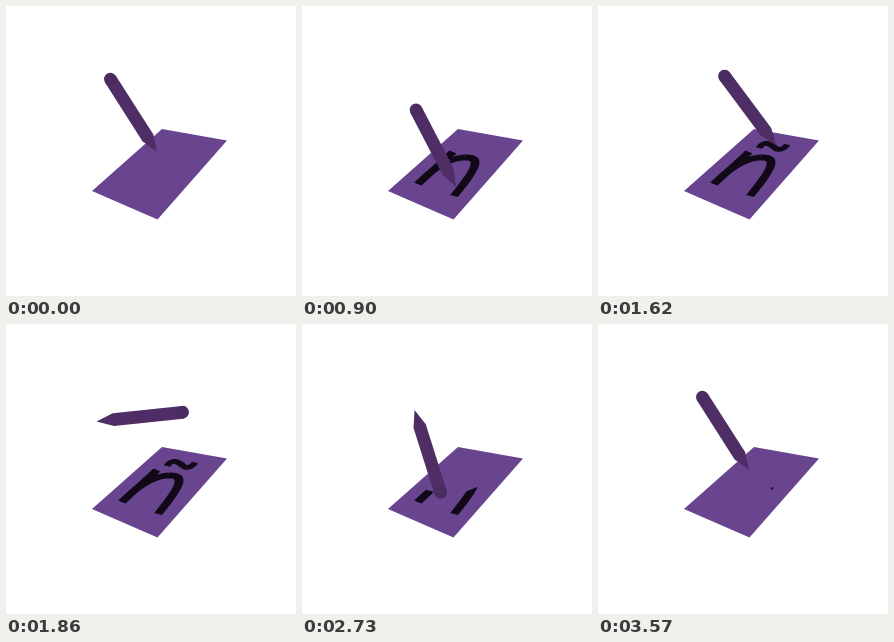
An HTML page with a canvas for the animation above (3600 ms loop, 290 by 290 pixels).

```html
<!DOCTYPE html>
<html lang="en">
<head>
<meta charset="utf-8">
<title>Pencil and eraser</title>
<style>
  html, body { margin: 0; width: 100%; height: 100%; overflow: hidden; background: #fff; }
  canvas { display: block; width: 290px; height: 290px; }
</style>
</head>
<body>
<canvas id="stage" width="290" height="290"></canvas>
<script>
const ctx = document.getElementById('stage').getContext('2d');
const LOOP = 3600, STEP = 30;
const LENGTH = 86.5, RADIUS = 6.4, SHOULDER = 17;
const CARD = '#69458f', INK = '#110917', BODY = '#4e2e65', CAP = '#4b2c60';
const WRITE_END = 1540, ERASE_START = 2025, ERASE_END = 3165, REST = 3570;

// Tip movement: start, end, ink width (0 = lifted), Bezier points
const writing = [
  [120, 330, 7.5, [151, 146], [140, 156], [128, 167], [116, 178]],
  [330, 580, 7.5, [116, 178], [130, 163], [148, 152], [162, 151.5]],
  [580, 820, 7.5, [162, 151.5], [181, 150.5], [174, 163], [152, 190]],
  [820, 1230, 0, [152, 190], [155, 176], [160, 150], [161, 142]],
  [1230, 1370, 6, [161, 142], [166, 134], [173, 138], [177, 142]],
  [1370, WRITE_END, 6, [177, 142], [181, 145], [186, 143], [189, 138.5]]
];

// Turning points of the eraser, rubbed along at constant speed
const rubbing = [
  [164, 139], [186, 141], [146, 147], [129, 159], [174, 155],
  [116, 177], [152, 183], [168, 171], [154, 188]
];

const clamp = (v, low = 0, high = 1) => Math.max(low, Math.min(high, v));
const span = (t, start, end) => clamp((t - start) / (end - start));
const mix = (a, b, u) => a + (b - a) * u;
const mixPoint = (a, b, u) => [mix(a[0], b[0], u), mix(a[1], b[1], u)];

// Works for any number of control points
function bezier(points, u) {
  while (points.length > 1) {
    points = points.slice(1).map((p, i) => mixPoint(points[i], p, u));
  }
  return points[0];
}

// The part of a polyline covered after a share of its length
function partOf(points, share) {
  const gap = i => Math.hypot(points[i][0] - points[i - 1][0], points[i][1] - points[i - 1][1]);
  let left = 0;
  for (let i = 1; i < points.length; i++) left += gap(i) * share;
  const part = [points[0]];
  for (let i = 1; i < points.length && left > 0; i++) {
    part.push(mixPoint(points[i - 1], points[i], Math.min(1, left / gap(i))));
    left -= gap(i);
  }
  return part;
}

const rubbed = t => partOf(rubbing, span(t, ERASE_START, ERASE_END));

// Poses hold the pencil's centre and the direction from tip to round end in degrees
function poseAt([x, y], degrees, side) {
  const angle = degrees * Math.PI / 180, half = side * LENGTH / 2;
  return { center: [x + Math.cos(angle) * half, y + Math.sin(angle) * half], degrees };
}

function writePose(t) {
  const [start, end, , ...points] = writing.find(move => t <= move[1]) || writing[writing.length - 1];
  const tip = bezier(points, span(t, start, end));
  const dx = tip[0] - 151, dy = tip[1] - 144;
  return poseAt(tip, Math.max(-140, -123 - 0.6 * dx - 0.0056 * dx * dx + 0.2 * dy), 1);
}

function erasePose(t) {
  const end = rubbed(t).pop();
  return poseAt(end, clamp(79.5 - 1.26 * (end[0] - 133), 43, 84), -1);
}

function flip(from, to, via, u) {
  return {
    center: bezier([from.center, via, to.center], u),
    degrees: mix(from.degrees, to.degrees, u)
  };
}

function pose(t) {
  if (t < WRITE_END) return writePose(t);
  if (t < ERASE_START) {
    const u = span(t, WRITE_END, ERASE_START);
    return flip(writePose(WRITE_END), erasePose(ERASE_START), [131, 67], u * u * (3 - 2 * u));
  }
  if (t < ERASE_END) return erasePose(t);
  const u = span(t, ERASE_END, REST);
  return flip(erasePose(ERASE_END), writePose(0), [133, 124], 1 - (1 - u) ** 1.8);
}

function trace(points) {
  ctx.beginPath();
  for (const p of points) ctx.lineTo(...p);
}

function drawCard() {
  ctx.fillStyle = CARD;
  trace([[156, 123], [221, 134.5], [151.5, 213.5], [86, 185]]);
  ctx.fill();
}

function drawInk(t) {
  ctx.strokeStyle = INK;
  ctx.lineCap = 'butt';
  ctx.lineJoin = 'round';
  for (const [start, end, width, ...points] of writing) {
    const progress = span(t, start, end);
    if (!width || !progress) continue;
    trace(Array.from({ length: 25 }, (_, i) => bezier(points, progress * i / 24)));
    // The nib lies in the plane of the card
    ctx.save();
    ctx.transform(0.92, 0.39, 0.74, -0.67, 0, 0);
    ctx.lineWidth = width;
    ctx.stroke();
    ctx.restore();
  }
}

function drawErased(t) {
  if (t < ERASE_START) return;
  ctx.strokeStyle = CARD;
  ctx.lineWidth = 16;
  ctx.lineCap = ctx.lineJoin = 'round';
  trace(rubbed(t));
  ctx.stroke();
}

function drawPencil({ center, degrees }) {
  ctx.save();
  ctx.translate(...center);
  ctx.rotate(degrees * Math.PI / 180);
  ctx.translate(-LENGTH / 2, 0);
  ctx.fillStyle = BODY;
  trace([[0, 0], [SHOULDER, -RADIUS], [LENGTH, -RADIUS], [LENGTH, RADIUS], [SHOULDER, RADIUS]]);
  ctx.fill();
  ctx.fillStyle = CAP;
  ctx.beginPath();
  ctx.arc(LENGTH, 0, RADIUS, 0, Math.PI * 2);
  ctx.fill();
  ctx.restore();
}

const origin = performance.now();

function frame(now) {
  const t = Math.floor(Math.max(0, now - origin) % LOOP / STEP) * STEP;
  ctx.fillStyle = '#fff';
  ctx.fillRect(0, 0, 290, 290);
  drawCard();
  drawInk(t);
  drawErased(t);
  drawPencil(pose(t));
  requestAnimationFrame(frame);
}

requestAnimationFrame(frame);
</script>
</body>
</html>
```
